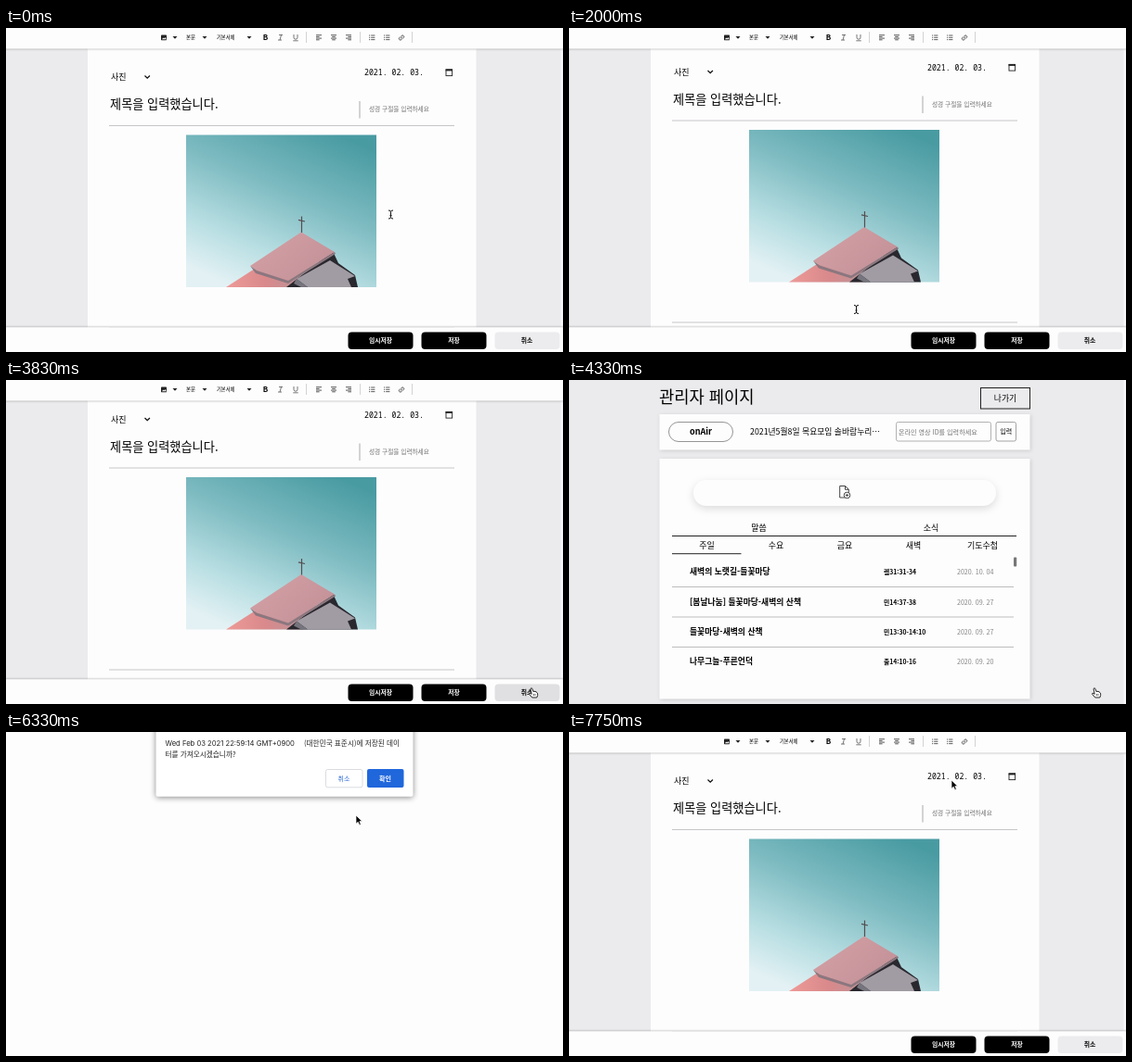
Animation of 600x350 px, one loop 8000 ms. Source, as an HTML page:

```html
<!DOCTYPE html>
<html lang="ko">
<head>
<meta charset="utf-8">
<title>Editor demo</title>
<style>
  html, body { margin: 0; width: 100%; height: 100%; overflow: hidden; background: #fefdfe; }
  svg { display: block; width: 600px; height: 350px; }
  text { font-family: "Noto Sans CJK KR", "Noto Sans CJK", "Noto Sans", sans-serif; white-space: pre; }
  .mono { font-family: "Noto Sans Mono", "DejaVu Sans Mono", monospace; }
  .latin { font-family: Inter, Roboto, sans-serif; }
  .card { fill: #fefdfe; filter: drop-shadow(1px 1.5px 2px #0002); }
  .pill { fill: #fefdfe; filter: drop-shadow(0 3px 4px #0002); }
  .bar { fill: #fefdfe; filter: drop-shadow(0 0 1.3px #0006); }
  .dialog { fill: #fff; filter: drop-shadow(0 1px 3px #0007); }
</style>
</head>
<body>
<svg id="stage" viewBox="0 0 600 350" xmlns="http://www.w3.org/2000/svg"></svg>
<script>
const LOOP = 8000, FPS = 12;

const label = (x, y, size, str, attrs = '') =>
  `<text x="${x}" y="${y}" font-size="${size}" ${attrs}>${str}</text>`;
const mid = (x, y, size, str, attrs = '') => label(x, y, size, str, `text-anchor="middle" ${attrs}`);
const rect = (x, y, w, h, attrs = '') => `<rect x="${x}" y="${y}" width="${w}" height="${h}" ${attrs}/>`;
const path = (d, attrs = '') => `<path d="${d}" ${attrs}/>`;
const line = (d, color = '#222', width = 1) => path(d, `fill="none" stroke="${color}" stroke-width="${width}"`);
const group = (id, body, attrs = '') => `<g id="${id}" ${attrs}>${body}</g>`;
const BOLD = 'font-weight="700"', MEDIUM = 'font-weight="500"';

const defs = `<defs>
  <linearGradient id="sky" x1=".8" y1="0" x2=".25" y2="1">
    <stop offset="0" stop-color="#499ba2"/><stop offset=".4" stop-color="#7dbbc1"/>
    <stop offset=".75" stop-color="#b9dfe3"/><stop offset="1" stop-color="#e3f1f4"/>
  </linearGradient>
  <linearGradient id="roof" x1="0" y1="0" x2="1" y2=".6">
    <stop offset="0" stop-color="#d5a1a6"/><stop offset="1" stop-color="#c39298"/>
  </linearGradient>
  <linearGradient id="wall" x1="0" y1="0" x2="1" y2="0">
    <stop offset="0" stop-color="#ee9a98"/><stop offset=".4" stop-color="#d9898b"/><stop offset="1" stop-color="#a79da3"/>
  </linearGradient>
</defs>`;

const photo = rect(194, 115.5, 205, 164.5, 'fill="url(#sky)"') +
  path('M237 280L268 260L318 252L345 256L320 280Z', 'fill="url(#wall)"') +
  path('M302 280L352 241L358 254L376 267L379 280Z', 'fill="#29282e"') +
  path('M263 257L318 220.500L354 242L304 273L270 262Z', 'fill="url(#roof)"') +
  path('M263 257L270 262L304 273L354 242L355 244L304 276L269 265Z', 'fill="#8b777f"') +
  path('M313 271L349 251L376 268L368 271L372 280H325Z', 'fill="#a19ba3"') +
  path('M313 271L325 280H318L310 276Z', 'fill="#76757e"') +
  line('M318.500 203.500V221', '#564d50', 1.2) + line('M315 207.300L322 209', '#564d50', 1.2);

const arrowDown = x => path(`M${x - 2.5} 9h5l-2.500 2.700z`, 'fill="#222"');
const separator = x => line(`M${x} 4V16`, '#c8c8c8', .8);
const alignIcon = (x, shift) => line([0, 1, 2, 3].map(i => {
  const w = i % 2 ? 3.6 : 6;
  return `M${x - 3 + (6 - w) * shift} ${7.7 + i * 1.7}h${w}`;
}).join(''), '#333', .8);
const listIcon = x => line([0, 1, 2].map(i => `M${x - 3} ${8 + i * 2.3}h1.200m1 0h4.200`).join(''), '#333', .8);

const toolbar = rect(-5, -5, 610, 27.5, 'class="bar"') +
  rect(167, 7.6, 6, 5.6, 'rx=".7" fill="#222"') + path('M168 12.300l1.300-1.800 1 1 1.200-1.500 1.200 2.300z', 'fill="#fff"') +
  [182, 214, 262].map(arrowDown).join('') +
  label(194, 11.5, 5.5, '본문') + label(227, 11.5, 5.3, '기본서체') +
  mid(279.5, 13, 8, 'B', BOLD) +
  line('M294 7.500h4M293 13h4M296.500 7.500L295 13', '#555', .8) +
  line('M310 7v3.200a2 2 0 0 0 4 0V7M309.300 13.800h5.400', '#555', .8) +
  [323.5, 381.5, 437.5].map(separator).join('') +
  alignIcon(337, 0) + alignIcon(353, .5) + alignIcon(369, 1) + listIcon(394) + listIcon(410) +
  `<g transform="rotate(-40 426 10.500)">${line('M425.500 9h-1a1.500 1.500 0 0 0 0 3h1M426.500 9h1a1.500 1.500 0 0 1 0 3h-1M424.700 10.500h2.600', '#333', .8)}</g>`;

const footer = rect(-5, 323.2, 610, 32, 'class="bar"') +
  rect(368.5, 328.5, 70, 18.5, 'rx="4"') + mid(403.5, 339.8, 6.8, '임시저장', `fill="#fff" ${BOLD}`) +
  rect(447.5, 328.5, 70, 18.5, 'rx="4"') + mid(482.5, 339.8, 6.8, '저장', `fill="#fff" ${BOLD}`) +
  rect(526.5, 328.5, 70, 18.5, 'id="cancel" rx="4"') + mid(561, 339.8, 6.8, '취소', BOLD);

const documentBody = label(113, 56, 9, '사진', MEDIUM) + line('M149.500 51.500l2.700 2.700 2.700-2.700', '#111', 1.3) +
  label(386, 51.4, 8.2, '2021. 02. 03.', `class="mono" ${MEDIUM}`) +
  rect(474, 45, 6.6, 6.6, 'fill="none" stroke="#222" stroke-width=".9"') + rect(473.6, 44.4, 7.4, 2, 'fill="#222"') +
  label(112, 87, 13.2, '제목을 입력했습니다.', MEDIUM) +
  line('M381 79V97.500', '#aaa') + label(391, 90.2, 6.65, '성경 구절을 입력하세요', 'fill="#707070"') +
  line('M111 105.500H483M111 323.500H483', '#c6c5c7') + photo +
  group('caret', line('M296.500 298V306', '#111', .9));

const strip = rect(597.5, 0, 3, 350, 'fill="#f8f7f9"');
const editor = rect(0, 0, 600, 350, 'fill="#ebeaec"') + strip + rect(88, 0, 418.5, 350, 'fill="#fefdfe"') +
  group('doc', documentBody) + toolbar + footer;

const rows = [
  ['새벽의 노랫길-들꽃마당', '렘31:31-34', '2020. 10. 04'],
  ['[봄날나눔] 들꽃마당-새벽의 산책', '민14:37-38', '2020. 09. 27'],
  ['들꽃마당-새벽의 산책', '민13:30-14:10', '2020. 09. 27'],
  ['나무그늘-푸른언덕', '출14:10-16', '2020. 09. 20']
].map(([title, verse, date], i) => {
  const y = 210.3 + i * 32.3;
  return label(130, y, 8.8, title, BOLD) + label(339, y, 6.8, verse, BOLD) +
    label(418, y, 7.1, date, 'fill="#858585" font-weight="300"') +
    (i < 3 ? line(`M111 ${223.5 + i * 32.5}H479`, '#bdbdbd') : '');
}).join('');

const tabs = [['주일', 148.5], ['수요', 223], ['금요', 297], ['새벽', 371], ['기도수첩', 445.5]]
  .map(([name, x]) => mid(x, 181.8, 9, name, MEDIUM)).join('');

const admin = rect(0, 0, 600, 350, 'fill="#ebeaec"') + strip +
  label(97, 24.6, 17.7, '관리자 페이지', MEDIUM) +
  rect(443.5, 8.5, 53, 22.5, 'fill="none" stroke="#222"') + mid(470, 22.7, 8.8, '나가기') +
  rect(97.5, 37, 399, 38.5, 'class="card"') +
  rect(107.5, 45.5, 69, 21, 'rx="10.500" fill="none" stroke="#8a8a8a" stroke-width=".9"') + mid(142, 59, 9.1, 'onAir', BOLD) +
  rect(352.5, 45.5, 102, 20.5, 'rx="2" fill="none" stroke="#aaa" stroke-width=".9"') +
  label(355, 58.5, 7.1, '온라인 영상 ID를 입력하세요', 'fill="#757575"') +
  rect(460, 45.5, 21.5, 20.5, 'rx="2" fill="none" stroke="#999" stroke-width=".9"') + mid(470.7, 58.4, 7, '입력', MEDIUM) +
  rect(97.5, 85, 399, 259.5, 'class="card"') + rect(134, 108, 326, 28, 'rx="14" class="pill"') +
  line('M297 127h-5.300V114.500h5.800l3.800 3.800v3.200M297.500 114.500v3.800h3.800', '#444', 1) +
  `<circle cx="299.500" cy="124.500" r="3.300" fill="#fff" stroke="#444"/>` + line('M297.800 124.500h3.400M299.500 122.800v3.400', '#444', .9) +
  mid(204.5, 163, 9, '말씀', MEDIUM) + mid(390, 163, 9, '소식', MEDIUM) +
  line('M111 168.500H482') + tabs + line('M111 187.700H185.500') +
  group('loaded', label(195, 59, 8.8, '2021년5월8일 목요모임 솔바람누리⋯', MEDIUM) +
    rows + rect(479, 191.5, 3.2, 10, 'rx="1" fill="#777"'));

const dialog = rect(0, 0, 600, 350, 'fill="#fefdfe"') + group('prompt',
  rect(161.5, -10, 277, 79.7, 'rx="2" class="dialog"') +
  label(171.5, 15, 7.65, 'Wed Feb 03 2021 22:59:14 GMT+0900', 'class="latin" fill="#222"') +
  label(321, 15, 7.65, '(대한민국 표준시)에 저장된 데이', 'fill="#222"') +
  label(171.5, 27.2, 7.65, '터를 가져오시겠습니까?', 'fill="#222"') +
  rect(344.5, 40.5, 39.5, 19.3, 'rx="2" fill="#fff" stroke="#d9dce0"') +
  mid(364, 52.7, 7, '취소', `fill="#2467d2" ${MEDIUM}`) +
  rect(389, 40, 39.5, 20, 'id="confirm" rx="2"') + mid(408.5, 52.7, 7, '확인', `fill="#fff" ${BOLD}`));

const outline = 'stroke-linejoin="round"';
const cursors =
  group('beam', line('M-2.500-4.500Q0-4.500 0-3Q0-4.500 2.500-4.500M0-3V3M-2.500 4.500Q0 4.500 0 3Q0 4.500 2.500 4.500M-1 1H1', '#111', 1)) +
  group('arrow', path('M0 0V9.200L2.200 7.200L3.700 10.500L5.300 9.800L3.900 6.600H6.700Z', `fill="#000" stroke="#fff" stroke-width=".7" ${outline}`)) +
  group('hand', path('M-1 1Q0-.5 1 1L2 4.200L3 3.500L4 4.300L5 4L5.500 5Q7 5 6.700 8L5.800 10.500H.7L-2.500 6.700Q-2.500 5.300-1 6L.2 6.800Z',
    `fill="#fff" stroke="#111" stroke-width=".9" ${outline}`) + line('M2.400 6.500V8.600M4 6.500V8.600', '#111', .6));

const stage = document.getElementById('stage');
stage.innerHTML = defs + group('editor', editor) + group('admin', admin) + group('dialog', dialog) + group('pointer', cursors);
const part = id => document.getElementById(id);

const scrollTrack = [[920, 0], [1000, 9], [1080, 21], [1167, 28], [1333, 28], [1500, 18], [1750, 7], [2000, 5.5], [2667, 5.5], [3083, 9.5], [3417, 10.5]];
const pointerTrack = [
  [0, 414.5, 201.5], [170, 384, 230], [333, 328, 284], [500, 309.5, 304],
  [2583, 309.5, 304], [2917, 390, 307], [3250, 550, 314], [3417, 584, 318], [3667, 570, 331], [3833, 566, 332.5],
  [4417, 566, 332.5], [4583, 450, 240], [4833, 299, 108], [5000, 316, 125],
  [5750, 316, 125], [6000, 345, 110], [6333, 377, 90],
  [6417, 378, 88], [6667, 396, 68], [6917, 411, 47], [7167, 412, 52]
];
const sceneSteps = [[0, 'editor'], [4080, 'admin'], [5750, 'dialog'], [7410, 'editor']];
const cursorSteps = [[0, 'beam'], [3080, 'arrow'], [3580, 'hand'], [4490, 'arrow']];

function sample(track, t) {
  const i = track.findIndex(key => key[0] > t);
  if (i === 0) return track[0].slice(1);
  if (i < 0) return track[track.length - 1].slice(1);
  const a = track[i - 1], b = track[i], k = (t - a[0]) / (b[0] - a[0]);
  return a.slice(1).map((v, n) => v + (b[n + 1] - v) * k);
}
const current = (steps, t) => steps.filter(step => step[0] <= t).pop()[1];
const within = (t, from, to) => t >= from && t < to;
const show = (id, on) => { part(id).style.display = on ? '' : 'none'; };

function render(t) {
  const scene = current(sceneSteps, t), cursor = current(cursorSteps, t);
  ['editor', 'admin', 'dialog'].forEach(id => show(id, id === scene));
  ['beam', 'arrow', 'hand'].forEach(id => show(id, id === cursor));
  const scroll = t < 4080 ? sample(scrollTrack, t)[0] : 0;
  part('doc').setAttribute('transform', `translate(0 ${-scroll})`);
  part('pointer').setAttribute('transform', `translate(${sample(pointerTrack, t).join(' ')})`);
  show('caret', [990, 2080, 3080].some(start => within(t, start, start + 500)));
  show('loaded', t >= 4240);
  show('prompt', within(t, 5830, 7240));
  part('cancel').setAttribute('fill', within(t, 3580, 4080) ? '#e0dfe1' : '#ecebed');
  part('confirm').setAttribute('fill', t >= 6660 ? '#1c5cc9' : '#2067dc');
}

function tick(now) {
  const t = now % LOOP;
  render(Math.floor(t * FPS / 1000 + .05) * 1000 / FPS);
  requestAnimationFrame(tick);
}
render(0);
requestAnimationFrame(tick);
</script>
</body>
</html>
```
